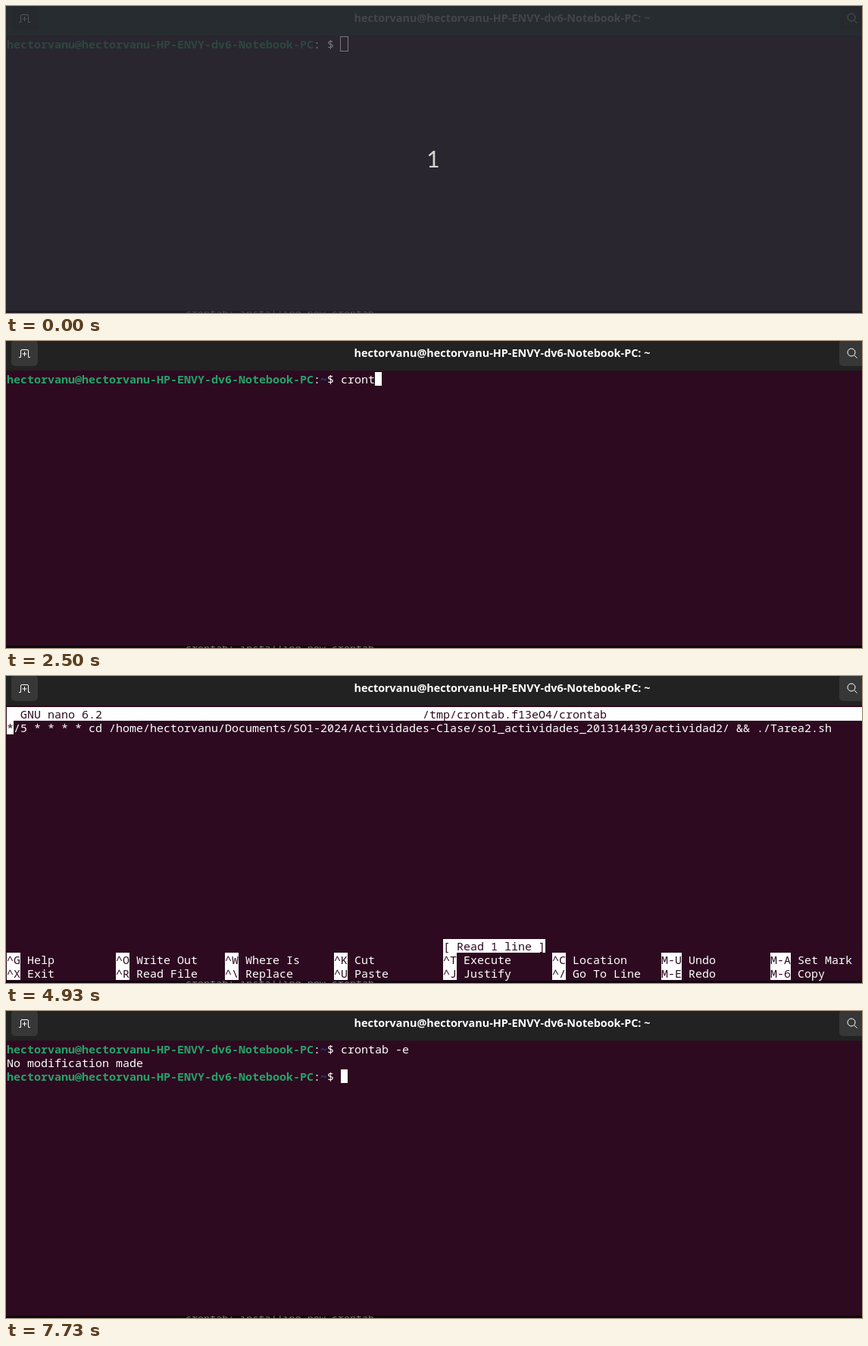
An HTML page with a canvas that plays this animation: 1130 by 405 pixels, repeating every 8 s.

```html
<!DOCTYPE html>
<html lang="en">
<head>
<meta charset="utf-8">
<title>Terminal: crontab</title>
<style>
html, body { margin: 0; width: 100%; height: 100%; overflow: hidden; background: #2d0a20; }
canvas { display: block; width: 1130px; height: 405px; }
</style>
</head>
<body>
<canvas id="stage" width="1130" height="405"></canvas>
<script>
const ctx = document.getElementById('stage').getContext('2d');
const W = 1130, H = 405, LOOP = 8000;
const CELL_W = 9, CELL_H = 18, LEFT = 1, TOP = 41;
const MONO = '15px "Noto Sans Mono", "DejaVu Sans Mono", monospace';
const HOST = 'hectorvanu@hectorvanu-HP-ENVY-dv6-Notebook-PC';
const PROMPT_COLS = HOST.length + 4;
const COMMAND = 'crontab -e';
const JOB = '*/5 * * * * cd /home/hectorvanu/Documents/SO1-2024/Actividades-Clase/' +
  'so1_actividades_201314439/actividad2/ && ./Tarea2.sh';
const SHORTCUTS = [
  ['^G Help', '^X Exit'], ['^O Write Out', '^R Read File'],
  ['^W Where Is', '^\\ Replace'], ['^K Cut', '^U Paste'],
  ['^T Execute', '^J Justify'], ['^C Location', '^/ Go To Line'],
  ['M-U Undo', 'M-E Redo'], ['M-A Set Mark', 'M-6 Copy']
];

// Times in ms
const COUNTDOWN_END = 30, FOCUS = 370, FOCUSED = 570;
const NANO_OPEN = 3800, NANO_CLOSE = 7730;
const KEY_TIMES = [1130, 1570, 2170, 2300, 2430, 2600, 2770, 2900, 3330, 3500];
const CURSOR_OFF = [[930, 1100], [2100, 2130], [4330, 4930], [5530, 6130], [6730, 6770], [7370, 7700]];

// Colours as RGB triples so that the focus change can be blended
const DIMMED = {
  bg: [41, 38, 48], header: [39, 44, 49], button: [38, 42, 47], icon: [82, 84, 90],
  title: [70, 69, 76], host: [44, 72, 62], path: [38, 46, 68], text: [122, 120, 126],
  strip: [29, 27, 36], under: [76, 75, 80]
};
const UNFOCUSED = {
  bg: [55, 12, 40], header: [43, 43, 43], button: [53, 53, 53], icon: [205, 205, 205],
  title: [184, 184, 184], host: [38, 162, 105], path: [22, 78, 150], text: [255, 255, 255],
  strip: [14, 8, 14], under: [180, 180, 180]
};
const FOCUSED_THEME = {
  ...UNFOCUSED, bg: [45, 10, 32], header: [34, 34, 34], button: [55, 55, 55],
  icon: [255, 255, 255], title: [255, 255, 255], under: [120, 120, 120]
};

function blend(from, to, k) {
  const out = {};
  for (const name in from) {
    const rgb = from[name].map((v, i) => Math.round(v + (to[name][i] - v) * k));
    out[name] = `rgb(${rgb})`;
  }
  return out;
}

function themeAt(t) {
  if (t < COUNTDOWN_END) return blend(DIMMED, DIMMED, 0);
  if (t < FOCUS) return blend(UNFOCUSED, FOCUSED_THEME, 0);
  const step = Math.floor((t - FOCUS) / ((FOCUSED - FOCUS) / 6)) + 1;
  return blend(UNFOCUSED, FOCUSED_THEME, Math.min(1, step / 7));
}

function rect(x, y, w, h, color) {
  ctx.fillStyle = color;
  ctx.fillRect(x, y, w, h);
}

function label(str, x, y, color, font, align = 'left') {
  ctx.font = font;
  ctx.textAlign = align;
  ctx.fillStyle = color;
  ctx.fillText(str, x, y);
}

const cellX = col => LEFT + col * CELL_W;
const cellY = row => TOP + row * CELL_H;

function write(str, col, row, color, bold = false) {
  label(str, cellX(col), cellY(row) + 15, color, (bold ? 'bold ' : '') + MONO);
}

function writeInverse(str, col, row, theme) {
  rect(cellX(col), cellY(row), str.length * CELL_W, CELL_H, theme.text);
  write(str, col, row, theme.bg);
}

function button(x, color) {
  ctx.fillStyle = color;
  ctx.beginPath();
  ctx.roundRect(x, -1, 35, 34, 5);
  ctx.fill();
}

function drawHeader(theme) {
  rect(0, 0, W, 39, theme.header);
  button(7, theme.button);
  button(1100, theme.button);
  label(HOST + ': ~', 655, 21, theme.title, 'bold 14.4px "Noto Sans", "Open Sans", sans-serif', 'center');

  ctx.strokeStyle = theme.icon;
  ctx.lineWidth = 1;
  ctx.beginPath();
  // New tab
  ctx.moveTo(17, 21.5);
  ctx.lineTo(19.5, 21.5);
  ctx.lineTo(19.5, 13);
  ctx.quadraticCurveTo(19.5, 11.5, 21, 11.5);
  ctx.lineTo(28, 11.5);
  ctx.quadraticCurveTo(29.5, 11.5, 29.5, 13);
  ctx.lineTo(29.5, 21.5);
  ctx.lineTo(32, 21.5);
  ctx.moveTo(24.5, 14);
  ctx.lineTo(24.5, 20);
  ctx.moveTo(21.5, 17);
  ctx.lineTo(27.5, 17);
  // Search
  ctx.moveTo(1121, 15);
  ctx.arc(1116, 15, 5, 0, Math.PI * 2);
  ctx.moveTo(1119.6, 18.6);
  ctx.lineTo(1123.5, 22.5);
  ctx.stroke();
}

// A sliver of the window behind shows along the bottom edge
function drawBottomStrip(theme) {
  ctx.save();
  ctx.beginPath();
  ctx.rect(0, 402, W, 3);
  ctx.clip();
  rect(0, 402, W, 3, theme.strip);
  label('crontab: installing new crontab', 237, 410, theme.under,
    '13.4px "Noto Sans Mono", "DejaVu Sans Mono", monospace');
  ctx.restore();
}

function drawPrompt(row, theme, typed = '') {
  const end = HOST.length;
  write(HOST, 0, row, theme.host, true);
  write(':', end, row, theme.text);
  write('~', end + 1, row, theme.path, true);
  write('$ ' + typed, end + 2, row, theme.text);
}

function drawCursor(col, row, theme) {
  rect(cellX(col), cellY(row), CELL_W, CELL_H, theme.text);
}

function drawShell(t, theme, cursorOn) {
  if (t >= NANO_CLOSE) {
    drawPrompt(0, theme, COMMAND);
    write('No modification made', 0, 1, theme.text);
    drawPrompt(2, theme);
    drawCursor(PROMPT_COLS, 2, theme);
    return;
  }
  const typed = KEY_TIMES.filter(time => t >= time).length;
  drawPrompt(0, theme, COMMAND.slice(0, typed));
  if (t < FOCUS) {
    ctx.strokeStyle = theme.text;
    ctx.lineWidth = 1;
    ctx.strokeRect(cellX(PROMPT_COLS) - 0.5, TOP - 0.5, CELL_W + 1, CELL_H + 1);
  } else if (cursorOn) {
    drawCursor(PROMPT_COLS + typed, 0, theme);
  }
}

function drawNano(theme, cursorOn) {
  rect(LEFT, TOP, W - LEFT, CELL_H, theme.text);
  write('GNU nano 6.2', 2, 0, theme.bg);
  write('/tmp/crontab.f13eO4/crontab', 61, 0, theme.bg);
  write(JOB, 0, 1, theme.text);
  if (cursorOn) writeInverse(JOB[0], 0, 1, theme);
  writeInverse('[ Read 1 line ]', 64, 17, theme);
  SHORTCUTS.forEach((pair, i) => pair.forEach((item, line) => {
    const split = item.indexOf(' ');
    writeInverse(item.slice(0, split), i * 16, 18 + line, theme);
    write(item.slice(split + 1), i * 16 + split + 1, 18 + line, theme.text);
  }));
}

function draw(t) {
  const theme = themeAt(t);
  const cursorOn = !CURSOR_OFF.some(([from, to]) => t >= from && t < to);
  rect(0, 0, W, H, theme.bg);
  drawHeader(theme);
  drawBottomStrip(theme);
  if (t >= NANO_OPEN && t < NANO_CLOSE) drawNano(theme, cursorOn);
  else drawShell(t, theme, cursorOn);
  if (t < COUNTDOWN_END) label('1', 564, 213, '#d6d4cc', '30px Lato, "DejaVu Sans", sans-serif', 'center');
}

const start = performance.now();
function tick() {
  draw((performance.now() - start) % LOOP);
  requestAnimationFrame(tick);
}
tick();
</script>
</body>
</html>
```
